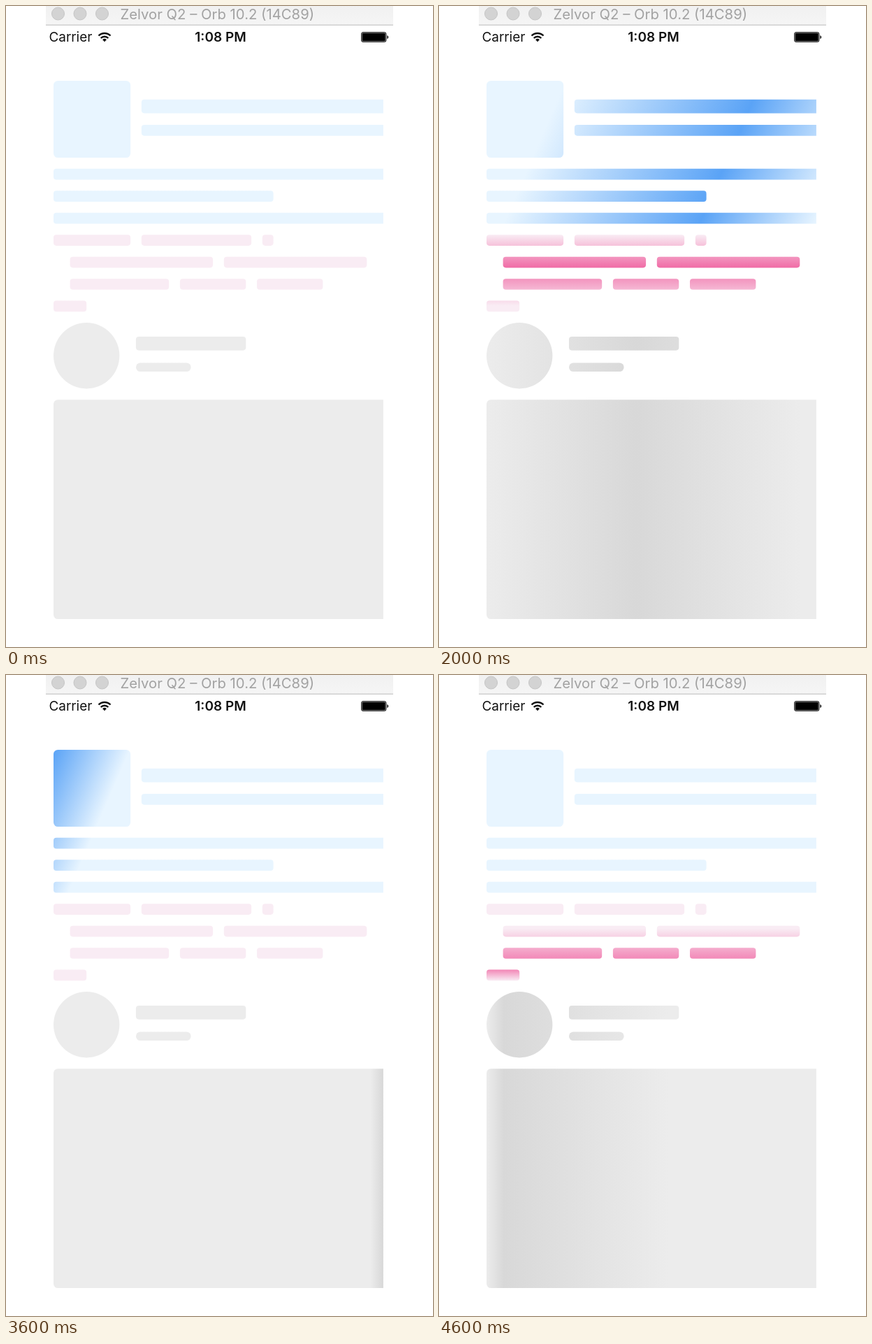
Write an HTML page that moves like this. It is 611 px wide and 917 px high and loops after 4800 ms.

```html
<!DOCTYPE html>
<html lang="en">
<head>
<meta charset="utf-8">
<title>Skeleton loading</title>
<style>
  html, body { margin: 0; width: 100%; height: 100%; overflow: hidden; background: #fff; }
  svg { display: block; width: 100vw; height: 100vh; }
  text { font-family: Inter, Roboto, sans-serif; }
</style>
</head>
<body>
<svg viewBox="0 0 611 917">
  <defs id="defs">
    <linearGradient id="bar" x2="0" y2="1">
      <stop offset="0" stop-color="#f1f1f1"/>
      <stop offset="1" stop-color="#f5f5f5"/>
    </linearGradient>
    <clipPath id="column"><rect width="300" height="500"/></clipPath>
  </defs>

  <rect x="57" width="497" height="27" fill="url(#bar)"/>
  <rect x="57" y="26.5" width="497" height="1.5" fill="#cfcfcf"/>
  <g id="lights" fill="#d3d3d3" stroke="#c5c5c5"></g>
  <text x="163.5" y="19" font-size="20.3" fill="#a2a2a2">Zelvor Q2 – Orb 10.2 (14C89)</text>

  <text x="61.5" y="51" font-size="18.9" fill="#111">Carrier</text>
  <g fill="none" stroke="#111" stroke-width="2.4">
    <path d="M132.5 42.5a12 12 0 0 1 17 0"/>
    <path d="M135.7 46a7.5 7.5 0 0 1 10.6 0"/>
  </g>
  <path d="M141 51.3l-2.9-3a4.1 4.1 0 0 1 5.8 0z" fill="#111"/>
  <text x="307" y="51" font-size="19" font-weight="600" text-anchor="middle" fill="#111">1:08 PM</text>
  <rect x="508.5" y="37.5" width="35.5" height="14" rx="2.5" fill="#777" stroke="#333"/>
  <rect x="510" y="39" width="32.5" height="11" rx="1" fill="#000"/>
  <path d="M545.3 42q2 .5 2 2.5t-2 2.5z" fill="#222"/>

  <!-- the list is laid out in points: 300 wide, rows 20 apart -->
  <g id="list" transform="translate(68 107) scale(1.573)" clip-path="url(#column)"></g>
</svg>
<script>
const LOOP = 4800, STEP = 200, SPEED = 1.22 / 1000, END = 1.5;
const WIDTH = 300, GAP = 10, PITCH = 20, OVERFLOW = 320;
const get = id => document.getElementById(id);

function add(parent, tag, attrs) {
  const node = document.createElementNS('http://www.w3.org/2000/svg', tag);
  for (const key in attrs) node.setAttribute(key, attrs[key]);
  return parent.appendChild(node);
}

// lead: position of the sweep's front when its clock is zero
function shimmer(id, base, peak, lead, x1, y1, x2, y2) {
  const gradient = add(get('defs'), 'linearGradient',
    { id, gradientUnits: 'userSpaceOnUse', x1, y1, x2, y2 });
  const stops = [base, peak, base].map(color =>
    add(gradient, 'stop', { offset: 0, 'stop-color': color }));
  return { lead, stops, base, peak };
}

function block(id, x, y, width, height = 10, rx = 2.6) {
  add(get('list'), 'rect', { x, y, width, height, rx, fill: `url(#${id})` });
}

function words(id, y, indent, ...widths) {
  let x = indent;
  for (const width of widths) {
    block(id, x, y, width);
    x += width + GAP;
  }
}

for (let i = 0; i < 3; i++) add(get('lights'), 'circle', { cx: 74.5 + 31.5 * i, cy: 11, r: 9 });

const sweeps = [
  shimmer('blue', '#e8f5ff', '#5aa3f6', 0.226, 0, 0, WIDTH, 130),
  shimmer('pink', '#f9ecf4', '#f06ea7', -0.055, 0, 140, 0, 210),
  shimmer('gray', '#ececec', '#d8d8d8', 0.07, WIDTH, 0, 0, 0)
];

block('blue', 0, 0, 70, 70, 4);
block('blue', 80, 17, OVERFLOW, 12.5);
block('blue', 80, 40, OVERFLOW);
[OVERFLOW, 200, OVERFLOW].forEach((width, i) => words('blue', 80 + PITCH * i, 0, width));

words('pink', 140, 0, 70, 100, 10);
words('pink', 160, 15, 130, 130);
words('pink', 180, 15, 90, 60, 60);
words('pink', 200, 0, 30);

block('gray', 0, 220, 60, 60, 30);
block('gray', 75, 232.7, 100, 12.5);
block('gray', 75, 256.5, 50, 8, 4);
block('gray', 0, 290, OVERFLOW, 199.5, 4);

// The first sweep runs evenly, the second gathers speed.
function sweepClock(time) {
  if (time < 3000) return time - 1200;
  const t = time - 3600;
  return t * (0.834 + 0.00032 * t) - 25;
}

const clamp = value => Math.min(1, Math.max(0, value));

function draw(time) {
  const clock = sweepClock(time);
  for (const { lead, stops, base, peak } of sweeps) {
    const front = lead + clock * SPEED;
    const active = front > 0 && front < END;
    stops.forEach((stop, i) => stop.setAttribute('offset', clamp(front - 1 + i / 2)));
    stops[1].setAttribute('stop-color', active ? peak : base);
  }
}

const started = performance.now();
function tick() {
  const time = (performance.now() - started) % LOOP;
  draw(Math.floor(time / STEP) * STEP);
  requestAnimationFrame(tick);
}
tick();
</script>
</body>
</html>
```
